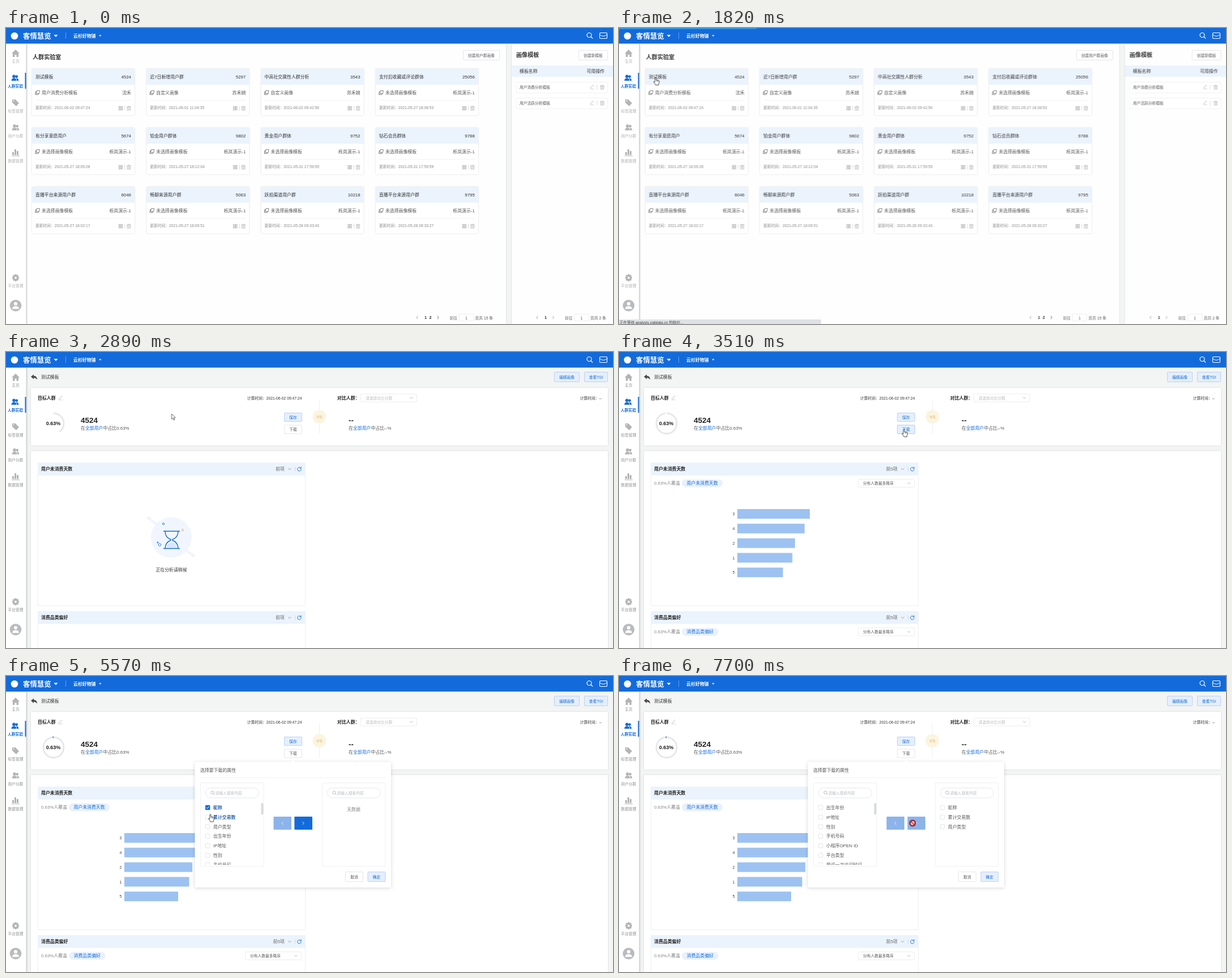
These frames come from a looping animation (1072 by 522 pixels, 8 s). An HTML page:

```html
<!DOCTYPE html>
<html lang="zh-CN">
<head>
<meta charset="utf-8">
<title>人群实验室</title>
<style>
html, body { margin: 0; width: 100%; height: 100%; overflow: hidden; background: #f3f4f4; }
svg { display: block; width: 1072px; height: 522px; font-family: "Liberation Sans", "Noto Sans CJK SC", "Noto Sans CJK", sans-serif; }
text { white-space: pre; }
.card { filter: drop-shadow(0 .7px 1px rgba(0,0,0,.16)); }
.float { filter: drop-shadow(0 1px 3px rgba(0,0,0,.16)); }
.line { fill: none; stroke: currentColor; stroke-linecap: round; stroke-linejoin: round; }
</style>
</head>
<body>
<svg id="stage" viewBox="0 0 1072 522"></svg>
<script>
const LOOP = 8000, BLUE = '#136bdb', PALE = '#ebf3fd', GREY = '#b4b4b4';
const BOLD = 'font-weight="700"', MID = 'text-anchor="middle"', END = 'text-anchor="end"';
const S = 6.76, N = 7.9;

// Drawing helpers; text is placed by its vertical centre
const T = (x, y, size, str, fill = '#444', opt = '') =>
  `<text x="${x}" y="${y + size * .37}" font-size="${size}" fill="${fill}" ${opt}>${str}</text>`;
const R = (x, y, w, h, fill, opt = '') =>
  `<rect x="${x}" y="${y}" width="${w}" height="${h}" fill="${fill}" ${opt}/>`;
const box = (x, y, w, h, fill = '#fff', stroke = '#e4e6ea', r = 1) =>
  R(x + .5, y + .5, w - 1, h - 1, fill, `stroke="${stroke}" stroke-width=".7" rx="${r}"`);
const G = (cls, body, opt = '') => `<g class="${cls}" ${opt}>${body}</g>`;
const C = (x, y, r, fill, opt = '') => `<circle cx="${x}" cy="${y}" r="${r}" fill="${fill}" ${opt}/>`;
const L = (d, color = '#999', w = .8) => `<path class="line" d="${d}" color="${color}" stroke-width="${w}"/>`;
const each = (n, fn) => Array.from({ length: n }, (_, i) => fn(i)).join('');
const button = (x, y, w, h, label, blue) =>
  box(x, y, w, h, blue ? '#e5effc' : '#fff', blue ? '#a3c5f2' : '#d9dce1') +
  T(x + w / 2, y + h / 2, S, label, blue ? BLUE : '#555', MID);

// Icons
const pen = (x, y) => L(`M${x - 2.5} ${y + 2}l.3-1.6 4.2-4.2 1.2 1.2-4.2 4.2zM${x - 2.5} ${y + 3.5}h6`, '#b5b8bd', .6);
const bin = (x, y) => L(`M${x - 3.5} ${y - 2.3}h7M${x - 1.2} ${y - 2.5}v-1h2.4v1M${x - 2.7} ${y - 2}v5.6h5.4v-5.6M${x - .9} ${y - .5}v2.6M${x + .9} ${y - .5}v2.6`, '#aaa', .7);
const tiles = (x, y) => each(4, i =>
  R(x - 3.2 + i % 2 * 3.8, y - 3.2 + (i >> 1) * 3.8, 2.6, 2.6, 'none', 'stroke="#aaa" stroke-width=".8"'));
const sheets = (x, y) => L(`M${x - 1.5} ${y - 3.5}h5l-1 5h-5zM${x - 2.2} ${y - 1.5}h-1.6l-.5 5h5.4l.5-1.6`, '#666', .8);
const chev = (x, y, dx, dy, color = '#888') =>
  L(dx ? `M${x - dx} ${y - 2.4}l${2 * dx} 2.4l${-2 * dx} 2.4` : `M${x - 2.4} ${y - dy}l2.4 ${2 * dy}l2.4 ${-2 * dy}`, color);
const people = (x, y, f) => C(x - 2, y - 2.6, 2.8, f) + C(x + 2.8, y - 2.4, 2.3, f) +
  `<path d="M${x - 6.5} ${y + 5}q0-4.5 4.5-4.5t4.5 4.5zM${x + 3.2} ${y + 5}q0-3-1.6-4.5q4.4-.8 4.8 4.5z" fill="${f}"/>`;
const lens = (x, y, color, r, w) => C(x, y, r, 'none', `stroke="${color}" stroke-width="${w}"`) +
  L(`M${x + r * .75} ${y + r * .75}l${r * .7} ${r * .7}`, color, w);
const reload = (x, y) => L(`M${x + 2.5} ${y - 2}a3.3 3.3 0 1 0 .8 2.4M${x + 3.2} ${y - 3.6}v2.2h-2.2`, BLUE, .9);

// Fixed frame around the page
function header() {
  return R(0, 0, 1072, 27.5, BLUE) + R(0, 0, 1072, 2, '#2f95e2', 'class="load"') +
    C(15, 14, 6.3, '#fff') + T(30, 14, 12.4, '客情慧览', '#fff', 'font-weight="900"') +
    '<path d="M84.500 12h7l-3.500 4z M164 12.500h4.600l-2.300 2.600z" fill="#fff"/>' +
    R(105, 8, .8, 11, '#78aaeb') + T(119, 14, N, '云杉好物铺', '#fff', BOLD) +
    lens(1030, 12.500, '#fff', 4, 1.2) +
    R(1048.500, 8.500, 13, 10, 'none', 'rx="1.500" stroke="#fff" stroke-width="1.100"') + L('M1049 12q6 5 12 0', '#fff', 1);
}

function sidebar() {
  const label = (y, s) => T(17, y, S, s, 'currentColor', MID);
  return R(0, 27.5, 35.5, 495, '#fff', 'style="filter:drop-shadow(1px 0 1.500px rgba(0,0,0,.25))"') +
    `<path d="M10 45l7-7 7 7h-2v6h-3.500v-4h-3v4h-3.500v-6z" fill="${GREY}"/>` +
    people(16, 88, BLUE) + T(16.5, 102, S, '人群实验', BLUE, MID + BOLD.replace(/^/, ' ')) + R(33.5, 79, 2, 28, BLUE) +
    `<path d="M11 126h5.500l6.500 6.500-5 5.500-7-6.500z" fill="${GREY}"/>` + C(13.5, 128.5, 1, '#fff') +
    people(17, 175.5, GREY) +
    [[11, 5], [15, 10], [19, 7]].map(([x, h]) => R(x, 224 - h, 3, h, GREY)).join('') + R(10, 225, 14, 1, GREY) +
    each(8, i => R(15.5, 434.5, 3, 12, GREY, `transform="rotate(${i * 45} 17 440.500)"`)) +
    C(17, 440.5, 4.6, GREY) + C(17, 440.5, 1.9, '#fff') +
    C(17, 489.5, 10.3, '#b9bbbf') + C(17, 486.3, 3, '#fff') + '<path d="M11 495.500q0-5 6-5t6 5z" fill="#fff"/>' +
    G('side', label(58, '主页') + label(146, '标签管理') + label(190, '用户分群') + label(234, '数据管理') + label(454, '平台管理'));
}

function pager(x, pages, total) {
  const right = x + 20 + pages * 8.5;
  return chev(x, 510.5, -.9, 0) + each(pages, i => T(x + 15 + i * 8.5, 510.5, N - .6, i + 1, '#333', MID + ' ' + BOLD)) +
    chev(right, 510.5, .9, 0, pages > 1 ? '#444' : '#999') +
    T(right + 20.5, 511, S, '前往', '#666') + box(right + 37, 504, 26, 13) + T(right + 50, 511, S, '1', '#555', MID) +
    T(right + 65.5, 511, S, `页共 ${total} 条`, '#555');
}

const DEMO = '栎岚演示-1', NONE = '未选择画像模板', OWN = '自定义画像';
const groups = `测试模板|4524|用户消费分析模板|沈禾|06-02 09:47:24
近7日新增用户群|5297|${OWN}|苏禾婉|06-01 11:04:35
中高社交属性人群分析|3543|${OWN}|苏禾婉|06-02 09:42:56
支付后收藏或评论群体|25056|${NONE}|${DEMO}|05-27 18:08:53
有分享意愿用户|5674|${NONE}|${DEMO}|05-27 18:09:28
铂金用户群体|9802|${NONE}|${DEMO}|05-27 18:12:04
黄金用户群体|9752|${NONE}|${DEMO}|05-31 17:59:59
钻石会员群体|9788|${NONE}|${DEMO}|05-31 17:59:59
直播平台来源用户群|6046|${NONE}|${DEMO}|05-27 18:02:17
畅聊来源用户群|5063|${NONE}|${DEMO}|05-27 18:09:51
跃拍渠道用户群|10218|${NONE}|${DEMO}|05-28 09:33:43
直播平台来源用户群|9795|${NONE}|${DEMO}|05-28 09:33:27`.split('\n').map(s => s.split('|'));

function groupCard([name, count, tpl, owner, time], i) {
  return G('card', R(0, 0, 181, 82, '#fff', 'rx="1.500"') + R(0, 0, 181, 28, PALE) +
    T(6, 14.5, N, name, '#333') + T(175, 14.5, N, count, '#333', END) +
    sheets(10, 42) + T(17, 42, N, tpl, '#555') + T(175, 42, N, owner, '#555', END) +
    R(6, 55, 169, .7, '#ebebeb') + T(6, 68.5, S, '更新时间：2021-' + time, '#888') +
    tiles(156.5, 69.5) + R(163.5, 65.5, .7, 8, '#ccc') + bin(171, 69.5),
    `transform="translate(${46 + i % 4 * 202.3} ${72 + (i >> 2) * 104})"`);
}

function listPage() {
  const row = (y, s) => box(901, y, 162, 20, '#fff', '#eee') + T(907, y + 9.5, S, s, '#555') +
    pen(1034.5, y + 9) + R(1043.5, y + 5.5, .7, 8, '#ccc') + bin(1053, y + 9.5);
  return R(36, 27.5, 847, 495, '#fefefe', 'class="card"') + R(893, 27.5, 179, 495, '#fefefe', 'class="card"') +
    T(47, 51, 10.1, '人群实验室', '#333', BOLD) + button(807, 39, 65, 18, '创建用户群画像') +
    groups.map(groupCard).join('') + pager(726, 2, 15) +
    T(901, 47.5, 10.1, '画像模板', '#333', BOLD) + button(1011, 39, 52, 18, '创建新模板') +
    R(893, 66, 179, 20, PALE) + T(907, 76, N, '模板名称', '#333') + T(1057, 76, N, '可用操作', '#333', END) +
    row(95, '用户消费分析模板') + row(123, '用户活跃分析模板') + pager(938, 1, 2);
}

// Analysis page
const select = (x, y, s, color) => box(x, y, 100, 15) + T(x + 9, y + 7.5, S, s, color) + chev(x + 90, y + 7.5, 0, 1.1, '#aaa');
const share = (x, v) => T(x, 134.5, N, `在<tspan fill="${BLUE}">全部用户</tspan>中占比${v}%`, '#555');

function panel(y, title, pill) {
  return R(56.5, y + .5, 472, 252, '#fff', 'stroke="#ececec" stroke-width=".8"') + R(56, y, 472.5, 22.5, PALE) +
    T(62, y + 11.5, N, title, '#222', BOLD) + chev(501, y + 11.5, 0, 1.2) + R(510, y + 7.5, .7, 8, '#ccc') + reload(518, y + 11.5) +
    G('wait', T(492, y + 11.5, N, '前项', '#666', END)) +
    G('data', T(492, y + 11.5, N, '前5项', '#666', END) + T(62, y + 36.5, N, '0.63%人覆盖', '#888') +
      R(111, y + 29.5, pill, 14, '#e8f1fd', 'rx="7"') + T(111 + pill / 2, y + 36.5, N, title, BLUE, MID) +
      select(422, y + 29, '分布人数最多降序', '#555'));
}

const hourglass = () => C(292, 327, 36, '#f1f6fe') +
  L('M252 293l28 22M304 340l27 19', '#f1f6fe', 5) + C(252, 293, 2.5, '#eef2f8') + C(331, 359, 2.5, '#eef2f8') +
  L('M278.500 316h28M278.500 346.500h28M281 316q0 11 10 14.500v1.500q-10 4-10 14.500M304 316q0 11-10 14.500v1.500q10 4 10 14.500', BLUE, 1.4) +
  '<path d="M283 345q2-8 9.500-9t9.500 9z" fill="#d8e7fb"/>' +
  [[278, 303, 1.6, BLUE], [312, 314, 1.6, '#eda35c'], [271.5, 340, 2.2, BLUE], [268, 336, 1.2, BLUE]]
    .map(([x, y, r, c]) => C(x, y, r, '#fff', `stroke="${c}" stroke-width=".9"`)).join('') +
  T(292, 384.5, N, '正在分析请稍候', '#333', MID);

function detailPage() {
  const bars = [[3, 151], [4, 140], [2, 120], [1, 114.5], [5, 95]];
  const ring = (cls, color) => C(84, 126, 18, 'none',
    `class="${cls}" pathLength="100" stroke="${color}" stroke-width="2.800" transform="rotate(-90 84 126)"`);
  return '<path d="M44 43.500l5-4v2.500q6 0 6 7q-2-3.500-6-3.500v2.500z" fill="#4a4a4a"/>' + T(62, 44.5, N, '测试模板', '#333') +
    button(968, 35, 45, 18, '编辑画像', 1) + button(1021, 35, 42, 18, '查看TGI', 1) +
    R(44, 63, 1019, 102, '#fff', 'class="card"') + R(44, 174.500, 1019, 360, '#fff', 'class="card"') +
    T(56, 81.5, N, '目标人群', '#222', BOLD) + pen(96, 81) + T(522.5, 81.5, S, '计算时间：2021-06-02 09:47:24', '#333', END) +
    ring('arc', '#e5e7eb') + ring('tick', '#3d5fc0') + T(83.5, 125.5, 9, '0.63%', '#222', MID + ' ' + BOLD) +
    T(132, 120, 13.5, '4524', '#222', BOLD) + share(132, '0.63') +
    button(491, 107, 32, 16, '保存', 1) + button(491, 128.5, 32, 16, '下载') + G('over', button(491, 128.5, 32, 16, '下载', 1)) +
    R(553, 84, .8, 60, '#ececec') + C(553.5, 114, 12, '#fbf5e0') + T(553.5, 114.5, N, 'VS', '#e3ab55', MID) +
    T(585, 81.5, N, '对比人群：', '#222', BOLD) + select(626, 73.5, '请选择对比分群', '#bbb') +
    T(1052, 81, S, '计算时间：--', '#333', END) + T(605, 120, 13.5, '--', '#222', BOLD) + share(605, '--') +
    panel(195, '用户未消费天数', 72) + panel(457, '消费品类偏好', 64.5) + G('wait', hourglass()) +
    G('data', bars.map(([k], i) => T(204.5, 285.5 + i * 25.8, S + .3, k, '#444', END)).join('') +
      G('', G('bars', bars.map(([, w], i) => R(0, 277 + i * 25.8, w, 17, '#9dc2f2')).join('')), 'transform="translate(209 0)"'));
}

// Download popover
const fields = ['昵称', '累计交易数', '用户类型', '出生年份', 'IP地址', '性别', '手机号码', '小程序OPEN ID', '平台类型', '最近一次访问时间'];
const rowY = i => 232 + i * 16.85;
const option = (x, i, name) => box(x, rowY(i) - 4.2, 8.4, 8.4, '#fff', '#d6d9df') + T(x + 14, rowY(i), N, name, '#555');
const options = (x, list) => list.map((s, i) => option(x, i, s)).join('');
const checked = i => G('check' + i, R(352, rowY(i) - 4.2, 8.4, 8.4, BLUE, 'rx="1"') + L(`M354 ${rowY(i)}l1.600 1.700l2.800-3.200`, '#fff', 1));
const lit = i => G('lit' + i, T(366, rowY(i), N, fields[i], BLUE));

function popover() {
  const side = x => box(x, 188, 112.5, 148, '#fff', '#e9ebee') + box(x + 9, 197, 95, 18.5, '#fff', '#dcdfe4', 9) +
    lens(x + 21.5, 205.5, '#aaa', 2.7, .8) + T(x + 26.5, 206.5, S, '请输入搜索内容', '#b8bbc0');
  return R(333.5, 151.5, 346.5, 221.5, '#fff', 'rx="1.500" class="float"') + '<path d="M503 152l4-3.500 4 3.500z" fill="#fff"/>' +
    T(343, 166, N, '选择要下载的属性', '#555') + R(343, 179, 327, .7, '#ececec') + side(343) + side(558) +
    G('', G('before', options(352, fields.slice(0, 7)) + [0, 1, 2].map(i => checked(i) + lit(i)).join('')) +
      G('after', options(352, fields.slice(3))), 'clip-path="url(#view)"') +
    G('before', T(614, 235.5, N, '无数据', '#888', MID)) + G('after', options(567, fields.slice(0, 3))) +
    R(450.5, 224, 4, 20.5, '#d8dadd', 'rx="2"') +
    R(472.5, 248, 31.5, 23, '#8cb4eb', 'rx="1"') + R(509.5, 248, 31.5, 23, '#8cb4eb', 'rx="1"') +
    R(509.5, 248, 31.5, 23, BLUE, 'rx="1" class="ready"') + R(509.5, 248, 31.5, 23, '#4289e2', 'rx="1" class="glow"') +
    chev(488, 259.5, -1, 0, '#fff') + chev(525, 259.5, 1, 0, '#fff') +
    button(599, 345, 32, 18, '取消') + button(638.5, 345, 32, 18, '确定', 1);
}

const pointer = () => G('arrow', '<path d="M0 0v9.500l2.200-2 1.600 3.500 1.600-.7-1.600-3.400h3z" fill="#fff" stroke="#222" stroke-width=".7"/>') +
  G('hand', '<path d="M-1 1q1-1.600 2 0v4q3-.6 5.500 1.200q.3 3-1 5.300v2h-5.500q-.6-2-3.500-5.500q.6-1.300 2.500.5z" fill="#fff" stroke="#222" stroke-width=".8"/>' +
    L('M2.500 5v2.500M4.300 5.500v2', '#222', .5)) +
  G('stop', C(0, 0, 4.7, '#fff', 'stroke="#222" stroke-width="2.600"') + C(0, 0, 4.7, 'none', 'stroke="#cf1f2c" stroke-width="1.700"') + L('M-3.200-3.200l6.400 6.400', '#cf1f2c', 1.7));

document.getElementById('stage').innerHTML =
  '<clipPath id="view"><rect x="345" y="222" width="104" height="111"/></clipPath>' +
  R(0, 0, 1072, 522, '#f3f4f4') + G('list', listPage()) + G('detail', detailPage()) + sidebar() + header() +
  G('status', R(-2, 514, 359, 10, '#dfe1e4', 'rx="1"') + T(1, 520, 6.6, '正在等待 analysis.zalldata.cn 的响应...', '#444')) +
  G('pop', popover()) + G('mouse', pointer());

// Keyframes from [ms, declarations] stops
const css = [];
function animate(sel, stops, ease = 'linear') {
  const name = 'k' + css.length;
  const all = [[0, stops[0][1]], ...stops, [LOOP, stops.at(-1)[1]]];
  css.push(`@keyframes ${name}{${all.map(([t, d]) => `${t / LOOP * 100}%{${d}}`).join('')}}` +
    `${sel}{animation:${name} ${LOOP}ms ${ease} infinite}`);
}
const show = (sel, ...times) =>
  animate(sel, [[0, 'opacity:0'], ...times.map((t, i) => [t, 'opacity:' + (i + 1) % 2])], 'step-end');
const curve = c => `;animation-timing-function:${c}`;
const EASE = curve('ease'), OUT = curve('cubic-bezier(.215,.61,.355,1)'), INOUT = curve('ease-in-out');
const fade = (o, x) => `opacity:${o};transform:translateX(${x}px)`;

animate('.list', [[1800, fade(1, 0) + EASE], [2200, fade(0, 16)]]);
animate('.detail', [[2430, fade(0, -16) + EASE], [2830, fade(1, 0)]]);
animate('.side', [[0, 'color:#b0b0b0'], [2000, 'color:#8f8f8f']], 'step-end');
animate('.load', [[1740, 'opacity:1;transform:scaleX(0)'], [1820, 'opacity:1;transform:scaleX(.222)'],
  [1980, 'opacity:1;transform:scaleX(1)'], [2080, 'opacity:0;transform:scaleX(1)']]);
animate('.arc', [[2740, 'stroke-dasharray:0 100' + OUT], [3740, 'stroke-dasharray:100 100']]);
animate('.bars', [[3050, 'transform:scaleX(0)' + OUT], [4050, 'transform:scaleX(1)']]);
animate('.pop', [[4140, 'opacity:0'], [4430, 'opacity:1']]);
css.push('.tick{stroke-dasharray:0 98.700 1.300 100}');
show('.tick', 3550);
show('.status', 1750, 2500);
show('.wait', 0, 3050);
show('.data', 3050);
show('.over', 3500, 4700);
show('.before', 0, 7630);
show('.after', 7630);
[5370, 5950, 6640].forEach((t, i) => show('.check' + i, t));
[5200, 5500, 6250].forEach((t, i) => show('.lit' + i, t));
show('.ready', 5370, 7630);
show('.glow', 7400, 7630);
show('.arrow', 80, 1580, 2500, 3350, 4680, 5180, 6960, 7330);
show('.hand', 1580, 2500, 3350, 4680, 5180, 6960, 7330, 7650);
show('.stop', 7650);

const at = (t, x, y, ease = '') => [t, `transform:translate(${x}px,${y}px)${ease}`];
animate('.mouse', [
  at(60, 1030, 526, INOUT), at(860, 119, 176), at(890, 119, 176, INOUT), at(1250, 61, 77), at(1380, 63, 80),
  at(1750, 63, 80), at(1800, 64.5, 87), at(2500, 64.5, 87, curve('ease-in')), at(2700, 165, 98), at(2890, 292, 109),
  at(3360, 499, 131, curve('ease-out')), at(3800, 507, 141), at(4540, 507, 141, INOUT), at(5340, 357, 231),
  at(5400, 357, 231), at(5560, 361, 243.5), at(5960, 361, 243.5, INOUT), at(6500, 357, 264),
  at(6780, 357, 265, INOUT), at(7560, 518.5, 259.5)
]);
document.head.appendChild(document.createElement('style')).textContent = css.join('\n');
</script>
</body>
</html>
```
